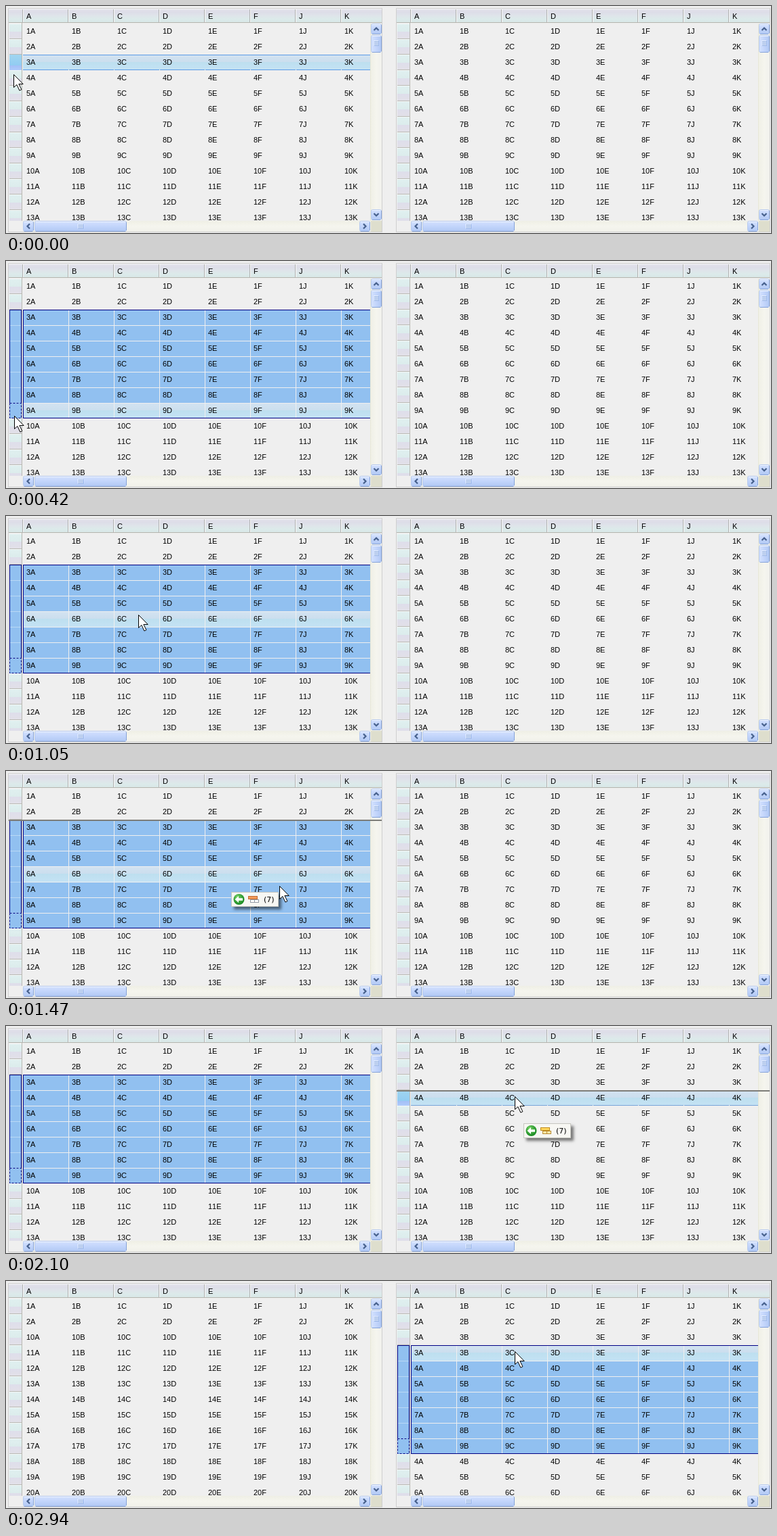
Animation, 1128 px wide and 336 px high, one loop 3780 ms. Source, as an HTML page with a canvas:

```html
<!DOCTYPE html>
<html lang="en">
<head>
<meta charset="utf-8">
<title>Dragging rows between two grids</title>
<style>
html, body { margin: 0; width: 1128px; height: 336px; overflow: hidden; background: #efefef; }
canvas { display: block; }
</style>
</head>
<body>
<canvas id="stage" width="1128" height="336"></canvas>
<script>
const ctx = document.getElementById('stage').getContext('2d');
const LOOP = 3780, ROW = 23, COL = 67, TOP = 26;
const NAVY = '#000084', PAPER = '#efefef', PICKED = '#91c0f0';
const COLUMNS = [...'ABCDEFJK'];
const RIGHT_X = 572;

const range = (from, to) => Array.from({ length: to - from + 1 }, (_, i) => from + i);
const rowY = row => TOP + (row - 1) * ROW;

const plain = range(1, 13);
const afterCut = [1, 2, ...range(10, 20)];
const afterDrop = [1, 2, 3, ...range(3, 9), 4, 5, 6];
const picked = { sel: [3, 9], focus: 9 };
const dragging = { ...picked, insert: 3 };

// Each step: start time, pointer tip, left grid, right grid, drag badge
const steps = [
  { at: 0, tip: [11, 101], left: { hover: 3, line: '#5b9be6' } },
  { at: 210, tip: [12, 187], left: { sel: [3, 7], focus: 7, hover: 7 } },
  { at: 420, tip: [12, 229], left: { ...picked, hover: 9 } },
  { at: 630, tip: [20, 223], left: { ...picked, hover: 9 } },
  { at: 840, tip: [157, 138], left: { ...picked, hover: 5 } },
  { at: 1050, tip: [195, 146], left: { ...picked, hover: 6 } },
  { at: 1260, tip: [257, 161], left: { ...picked, hover: 6 } },
  { at: 1470, tip: [403, 170], left: { ...dragging, hover: 6 }, badge: [332, 179] },
  { at: 1680, tip: [632, 145], left: dragging, badge: [645, 185] },
  { at: 1890, tip: [750, 111], left: picked, right: { hover: 5, line: '#78a4d8', insert: 5 }, badge: [763, 151], copy: true },
  { at: 2100, tip: [750, 104], left: picked, right: { hover: 4, line: '#78a4d8', insert: 4 }, badge: [763, 144], copy: true },
  { at: 2310, tip: [750, 104], left: { focus: 9 }, right: { hover: 4, line: '#76899b' } },
  { at: 2940, tip: [750, 104], left: { rows: afterCut, thumb: 27 },
    right: { rows: afterDrop, sel: [4, 10], focus: 10, hover: 4 } }
];

function box(x, y, w, h, fill) {
  ctx.fillStyle = fill;
  ctx.fillRect(x, y, w, h);
}

function frame(x, y, w, h, color) {
  ctx.strokeStyle = color;
  ctx.lineWidth = 1;
  ctx.strokeRect(x + .5, y + .5, w - 1, h - 1);
}

function fade(x, y, w, h, colors, across) {
  const g = across ? ctx.createLinearGradient(x, 0, x + w, 0) : ctx.createLinearGradient(0, y, 0, y + h);
  colors.forEach((c, i) => g.addColorStop(i / (colors.length - 1), c));
  box(x, y, w, h, g);
}

function path(points, close) {
  ctx.beginPath();
  points.forEach(p => ctx.lineTo(...p));
  if (close) ctx.closePath();
}

function text(s, x, y, font = '"Liberation Sans", Arial, sans-serif') {
  ctx.font = '11px ' + font;
  ctx.fontKerning = 'none';
  ctx.fillStyle = '#000';
  ctx.fillText(s, x, y);
}

function slab(x, y, w, h, across) {
  fade(x + 1, y + 1, w - 2, h - 2, ['#d3e1fd', '#c3d5fb', '#b2c9f4'], across);
  ctx.beginPath();
  ctx.roundRect(x + .5, y + .5, w - 1, h - 1, 2);
  ctx.strokeStyle = '#b7caee';
  ctx.lineWidth = 1;
  ctx.stroke();
  box(x + 2, y + 1, w - 4, 1, '#eef3ff');
  box(x + 2, y + h - 1, w - 4, 1, '#86a3d9');
  box(x + w - 1, y + 2, 1, h - 4, '#86a3d9');
}

function arrowButton(x, y, angle) {
  slab(x, y, 16, 16);
  ctx.save();
  ctx.translate(x + 8, y + 8);
  ctx.rotate(angle * Math.PI / 2);
  path([[-3.5, 2], [0, -1.5], [3.5, 2]]);
  ctx.strokeStyle = '#46608c';
  ctx.lineWidth = 2.2;
  ctx.stroke();
  ctx.restore();
}

function scrollbars(thumb) {
  fade(538, 26, 16, 292, ['#f0f0e6', '#f5f5ee', '#f1f1ed'], true);
  box(537, 26, 1, 292, '#e8e8d8');
  arrowButton(538, 26, 0);
  arrowButton(538, 301, 2);
  slab(538, 43, 16, thumb, true);
  const gripY = 38 + Math.ceil(thumb / 2);
  for (let i = 0; i < 4; i++) {
    box(542, gripY + i * 2, 7, 1, '#eef4ff');
    box(543, gripY + i * 2 + 1, 7, 1, '#8cabe0');
  }

  fade(25, 318, 513, 16, ['#efefe5', '#f5f5ee', '#f0f0ea']);
  arrowButton(25, 318, 3);
  arrowButton(521, 318, 1);
  slab(42, 318, 136, 16);
  for (let i = 0; i < 4; i++) {
    box(106 + i * 2, 322, 1, 7, '#eef4ff');
    box(107 + i * 2, 323, 1, 7, '#8cabe0');
  }
  box(538, 318, 16, 16, '#dedecd');
}

function header() {
  fade(4, 4, 550, 20, ['#e5e5ec', '#dddde8', '#dfe4ea', '#dceaea', '#d8e7e7']);
  box(4, 4, 550, 1, '#f2f2f4');
  box(4, 24, 550, 1, '#b5b5ae');
  COLUMNS.forEach((name, i) => {
    const x = 24 + i * COL;
    box(x, 5, 1, 19, '#aeb0b0');
    box(x + 1, 5, 1, 19, '#f8f8f8');
    text(name, x + 6, 19);
  });
}

function rowHeader(y, selected, hovered) {
  if (selected) {
    box(5, y, 18, ROW, PICKED);
    box(6, y, 16, 1, '#b9d8f5');
  } else if (hovered) {
    fade(5, y, 18, 16, ['#a0d5f0', '#91ccf2']);
    fade(5, y + 16, 18, 7, ['#a3bff6', '#afcbfb']);
  } else {
    fade(5, y, 18, 12, ['#e0f0f0', '#dcecec']);
    fade(5, y + 12, 18, 10, ['#dedeeb', '#e2e0e8']);
    box(5, y + 22, 18, 1, '#b9bab4');
    box(5, y, 18, 1, '#f4f8f8');
  }
}

function rowFill(y, selected, hovered, line) {
  if (selected) box(25, y, 512, ROW, PICKED);
  if (hovered) {
    fade(25, y, 512, 11, ['#d3e3f1', '#cbdeee']);
    fade(25, y + 11, 512, 12, ['#bddfef', '#c4e2f4']);
  }
  if (selected) {
    box(25, y, 512, 1, PAPER);
  } else if (hovered) {
    box(25, y, 512, 1, line);
    box(25, y + 22, 512, 1, line);
  }
  if (!selected && !hovered) return;
  const gap = selected ? ROW : 1;
  for (let c = 1; c < COLUMNS.length; c++) box(25 + c * COL, y + ROW - gap, 1, gap, PAPER);
}

function grid(x, { rows = plain, sel = [0, -1], focus, hover, line, insert, thumb = 26 } = {}) {
  ctx.save();
  ctx.translate(x, 0);
  frame(3, 3, 552, 332, '#cfcfcf');
  header();

  ctx.save();
  ctx.beginPath();
  ctx.rect(4, TOP - 1, 533, 293);
  ctx.clip();
  box(23, 25, 1, 293, '#b9b9b3');
  rows.forEach((label, i) => {
    const row = i + 1, y = rowY(row);
    const selected = row >= sel[0] && row <= sel[1];
    rowHeader(y, selected, row === hover);
    rowFill(y, selected, row === hover, line);
    COLUMNS.forEach((name, c) => text(label + name, 30 + c * COL, y + 15));
  });

  if (sel[0]) {
    const y = rowY(sel[0]), h = rowY(sel[1] + 1) - y;
    box(25, y, 512, 1, NAVY);
    box(25, y + h - 1, 512, 1, NAVY);
    box(25, y, 1, h, NAVY);
    box(5, y, 18, 1, NAVY);
    box(5, y, 1, h - ROW, NAVY);
    box(22, y, 1, h - ROW, NAVY);
  }
  if (focus) {
    ctx.setLineDash([3, 2]);
    frame(5, rowY(focus), 18, ROW, NAVY);
    ctx.setLineDash([]);
  }
  ctx.restore();

  scrollbars(thumb);
  if (insert) box(4, rowY(insert), 550, 2, '#7d7d78');
  ctx.restore();
}

function badge([x, y], copy) {
  ctx.save();
  ctx.translate(x, y);
  ctx.shadowColor = 'rgba(0,0,0,.5)';
  ctx.shadowBlur = 4;
  ctx.shadowOffsetX = ctx.shadowOffsetY = 4;
  box(0, 0, 70, 22, '#f7f7f3');
  ctx.shadowColor = 'transparent';
  frame(0, 0, 70, 22, '#c6c6c0');

  const g = ctx.createRadialGradient(9, 7, 1, 11, 10, 9);
  g.addColorStop(0, '#72cf62');
  g.addColorStop(1, '#188a22');
  ctx.beginPath();
  ctx.arc(11.5, 11, 8, 0, 7);
  ctx.fillStyle = g;
  ctx.fill();
  path([[5.5, 11], [11, 6], [11, 9.2], [17, 9.2], [17, 12.8], [11, 12.8], [11, 16]], true);
  ctx.fillStyle = '#fff';
  ctx.fill();

  const cell = (cx, cy, w, fill, edge) => {
    box(cx, cy, w, 5, fill);
    frame(cx, cy, w, 5, edge);
  };
  cell(25, 6, 14, copy ? '#ffd65c' : '#f29a58', copy ? '#c08a18' : '#c36a30');
  for (let i = 0; i < 2; i++) {
    cell(28 + i * 6, 11, 7, copy ? '#ffe9a8' : '#fff', copy ? '#b58a34' : '#929aa4');
  }
  text('(7)', 48, 15, '"DejaVu Sans", sans-serif');
  ctx.restore();
}

function pointer([x, y]) {
  ctx.save();
  ctx.translate(x + .5, y + .5);
  path([[0, 0], [0, 19], [4.4, 15], [8.4, 23.6], [11.4, 22.2], [7.4, 14], [13.7, 14]], true);
  ctx.fillStyle = '#fff';
  ctx.fill();
  ctx.strokeStyle = '#000';
  ctx.lineWidth = 1;
  ctx.stroke();
  ctx.restore();
}

function draw(step) {
  box(0, 0, 1128, 336, PAPER);
  grid(0, step.left);
  grid(RIGHT_X, step.right);
  if (step.badge) badge(step.badge, step.copy);
  pointer(step.tip);
}

const start = performance.now();
let shown;
function tick(now) {
  const t = Math.max(0, now - start) % LOOP;
  const step = steps.findLast(s => s.at <= t);
  if (step !== shown) draw(shown = step);
  requestAnimationFrame(tick);
}
tick(start);
</script>
</body>
</html>
```
